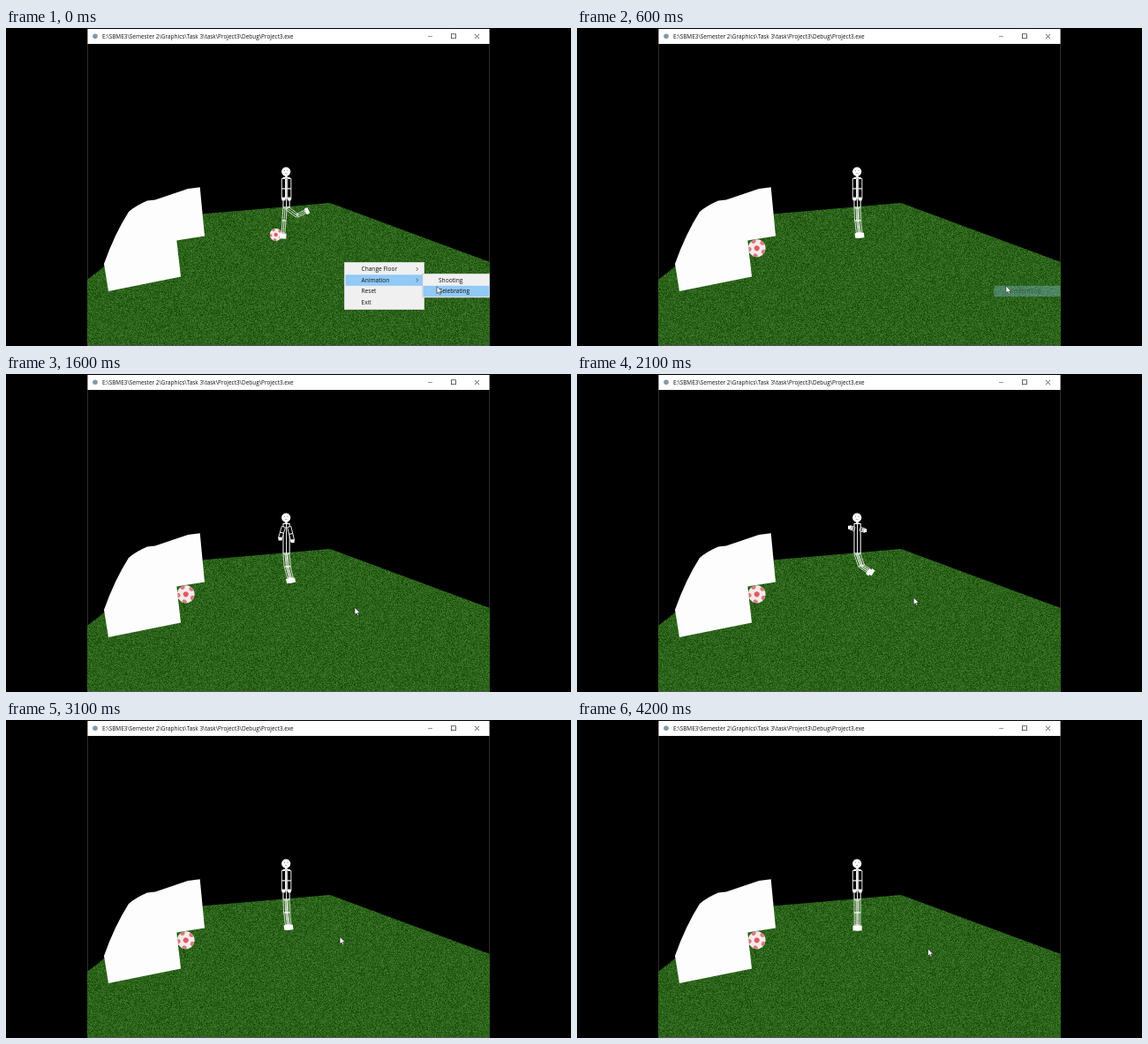
Recreate the animation shown at these times as an HTML page with a canvas. Size 640 px wide and 360 px high, loop 4.3 s.

```html
<!DOCTYPE html>
<html lang="en">
<head>
<meta charset="utf-8">
<title>Football scene</title>
<style>
  html, body { margin: 0; width: 100%; height: 100%; overflow: hidden; background: #000; }
  canvas { display: block; }
</style>
</head>
<body>
<canvas id="stage" width="640" height="360"></canvas>
<script>
const ctx = document.getElementById('stage').getContext('2d');
const LOOP = 4300, STEP = 100;
const SHOT_END = 600, CELEBRATE_PERIOD = 1250;
const FONT = '"Open Sans", sans-serif';
const HIGHLIGHT = '#91c9f7';
const CENTER = 317.6;

const lerp = (a, b, k) => a + (b - a) * k;
const clamp = (v, max = 1) => Math.max(0, Math.min(max, v));
const radians = degrees => degrees * Math.PI / 180;

function rect(x, y, w, h, color) {
  ctx.fillStyle = color;
  ctx.fillRect(x, y, w, h);
}

function disc(x, y, r, color) {
  ctx.beginPath();
  ctx.arc(x, y, r, 0, Math.PI * 2);
  ctx.fillStyle = color;
  ctx.fill();
}

function polygon(...points) {
  ctx.beginPath();
  points.forEach(p => ctx.lineTo(...p));
  ctx.closePath();
}

function line(x0, y0, x1, y1) {
  ctx.beginPath();
  ctx.moveTo(x0, y0);
  ctx.lineTo(x1, y1);
  ctx.stroke();
}

function pen(color, width) {
  ctx.strokeStyle = color;
  ctx.lineWidth = width;
}

function label(text, x, y, size = 6.6) {
  ctx.font = `${size}px ${FONT}`;
  ctx.fillStyle = '#111';
  ctx.fillText(text, x, y);
}

function makeGrass(w, h) {
  const tile = document.createElement('canvas');
  tile.width = w;
  tile.height = h;
  const g = tile.getContext('2d');
  const img = g.createImageData(w, h);
  let seed = 71;
  const random = () => (seed = (seed * 16807) % 2147483647) / 2147483647;
  for (let i = 0; i < w * h; i++) {
    const v = (random() + random() - 1) * 34;
    img.data.set([43 + v * 0.8, 99 + v, 26 + v * 0.65, 255], i * 4);
  }
  g.putImageData(img, 0, 0);
  return tile;
}
const grass = makeGrass(456, 163);

function drawWindow() {
  rect(0, 0, 640, 360, '#000');
  rect(92, 18, 1, 342, '#2c2c2c');
  rect(547, 18, 1, 342, '#2c2c2c');
  rect(92.4, 1, 455.2, 17, '#fff');
  disc(101, 9.3, 2.8, '#8499a8');
  label('E:\\SBME3\\Semester 2\\Graphics\\Task 3\\task\\Project3\\Debug\\Project3.exe', 109, 12, 6.45);
  pen('#555', 0.6);
  line(478, 9.5, 483, 9.5);
  pen('#222', 0.7);
  ctx.strokeRect(504.5, 6.8, 5, 5);
  line(531, 7, 536, 12);
  line(536, 7, 531, 12);
}

function drawField() {
  ctx.save();
  polygon([92, 285], [113, 268.5], [205, 212], [367, 198], [548, 265], [548, 359], [92, 359]);
  ctx.clip();
  ctx.drawImage(grass, 92, 197);
  ctx.restore();
  rect(92, 359, 456, 1, '#555');
}

function drawGoal() {
  ctx.beginPath();
  ctx.moveTo(116, 298);
  ctx.lineTo(111, 267);
  ctx.quadraticCurveTo(123, 233, 139, 208);
  ctx.quadraticCurveTo(147, 201, 160, 195.5);
  ctx.lineTo(169, 194.5);
  ctx.lineTo(206, 182);
  ctx.lineTo(219.7, 180.3);
  ctx.lineTo(225, 235.5);
  ctx.lineTo(193.3, 240.5);
  ctx.lineTo(198, 281.5);
  ctx.fillStyle = '#fdfdfd';
  ctx.fill();
}

function drawBall(t) {
  const k = clamp((t - 200) / 400);
  const r = lerp(7, 10, k);
  ctx.save();
  ctx.translate(lerp(305.7, 203.7, k), lerp(234, 249.3, k));
  ctx.rotate(0.5 - k * Math.PI * 2);
  ctx.scale(r, r);
  disc(0, 0, 1, '#f6eaea');
  ctx.clip();
  disc(0, 0, 0.3, '#dc5c62');
  for (let i = 0; i < 5; i++) {
    const a = i * Math.PI * 0.4;
    disc(Math.cos(a) * 0.88, Math.sin(a) * 0.88, 0.26, '#d8797f');
  }
  ctx.restore();
}

// Draws a wireframe box and returns its far end; angles grow clockwise from straight down on screen.
function limb(x, y, length, angle, width, fill) {
  const dx = -Math.sin(angle), dy = Math.cos(angle), h = width / 2;
  const endX = x - dx * length, endY = y + dy * length;
  polygon([x + dy * h, y + dx * h], [x - dy * h, y - dx * h],
    [endX - dy * h, endY - dx * h], [endX + dy * h, endY + dx * h]);
  if (fill) {
    ctx.fillStyle = fill;
    ctx.fill();
  }
  ctx.stroke();
  return [endX, endY];
}

function drawLeg(hipX, thigh, shin) {
  pen('#fff', 0.75);
  const hipY = 204;
  const knee = limb(hipX, hipY, 14, radians(thigh), 4.2);
  const reach = 14 - 4 * clamp(shin / 55);
  const ankle = limb(...knee, reach, radians(shin), 3.8);
  line(hipX, hipY, ...knee);
  line(...knee, ...ankle);
  ctx.save();
  ctx.translate(...ankle);
  ctx.rotate(-radians(shin));
  rect(-3.6, 0.5, 7.2, 6 - 2 * clamp(shin / 55), '#fff');
  ctx.restore();
}

// raise: 0 hanging, 1 level, 2 overhead
function drawArm(side, raise) {
  const angle = radians(raise * 90);
  const shoulderX = CENTER + side * 3.2, shoulderY = 170.5 + 5 * raise;
  const handX = shoulderX + side * 5.5 * Math.sin(radians(clamp(raise, 1.5) * 90));
  const handY = shoulderY + lerp(23, 15, raise / 2) * Math.cos(angle) + side * 1.8 * Math.sin(angle);
  const direction = Math.atan2(handX - shoulderX, handY - shoulderY);
  const half = Math.hypot(handX - shoulderX, handY - shoulderY) / 2;
  pen('#fff', 0.9);
  const elbow = limb(shoulderX, shoulderY, half, direction, 4.2, '#000');
  limb(...elbow, half, direction, 4.2, '#000');
  if (raise > 0.5) line(shoulderX, shoulderY, handX, handY);
  rect(handX - 1.9, handY - 1.9, 3.8, 3.8, '#fff');
}

function drawBody() {
  pen('#fff', 1);
  ctx.strokeRect(CENTER - 3.6, 169.5, 7.2, 33.5);
  line(CENTER, 170, CENTER, 203);
}

function drawHead() {
  rect(315.8, 167, 3.2, 2.5, '#ddd');
  disc(317.2, 162.6, 5.1, '#fff');
  for (const side of [-1, 1]) rect(316.8 + side * 1.7, 161, 0.8, 0.9, '#666');
  rect(316, 164.4, 2.4, 0.7, '#888');
}

function drawPlayer(t) {
  let raise = 0;
  if (t < SHOT_END) {
    const k = t / SHOT_END, swing = Math.sin(Math.PI * k);
    drawLeg(316, lerp(-4, 2, k), lerp(-4, 6, k));
    drawLeg(318.5, lerp(53, 2, k) - 40 * swing, lerp(115, 6, k) - 80 * swing);
  } else {
    const phase = (t - SHOT_END) % CELEBRATE_PERIOD;
    const bend = clamp(Math.min(0.12 + phase / 220, (1100 - phase) / 400));
    raise = clamp(Math.min(phase / 250, (1100 - phase) / 200), 2);
    for (const side of [-1, 1]) drawLeg(CENTER + side * 1.5, 19 * bend, 55 * bend);
  }
  drawBody();
  for (const side of [-1, 1]) drawArm(side, raise);
  drawHead();
}

function panel(x, y, w, h) {
  rect(x, y, w, h, '#c4c4c4');
  rect(x + 0.7, y + 0.7, w - 1.4, h - 1.4, '#f0f0f0');
}

function chevron(x, y) {
  pen('#333', 0.7);
  line(x, y - 2, x + 1.8, y);
  line(x + 1.8, y, x, y + 2);
}

function chosenRow() {
  rect(472.5, 291.8, 75, 12.2, HIGHLIGHT);
  label('Celebrating', 490, 300.2);
}

function drawMenu(t) {
  if (t < 200) {
    panel(383, 265, 91, 54);
    rect(384.5, 279.3, 88.5, 12.5, HIGHLIGHT);
    ['Change Floor', 'Animation', 'Reset', 'Exit'].forEach((text, i) => {
      label(text, 402.5, 275.2 + i * 12.6);
      if (i < 2) chevron(464.8, 273 + i * 12.5);
    });
    panel(471.5, 278, 76.5, 27.3);
    label('Shooting', 490, 287.8);
  }
  ctx.globalAlpha = clamp(1 - (t - 200) / 600);
  chosenRow();
  ctx.globalAlpha = 1;
}

// The pointer travels in straight legs between a few resting points.
const POINTER = [
  { t: 0, x: 488, y: 292.5 }, { t: 600, x: 486, y: 292 }, { t: 1200, x: 406, y: 273.5 },
  { t: 2100, x: 381.3, y: 253 }, { t: 3700, x: 376.2, y: 241 }, { t: LOOP - STEP, x: 397.5, y: 259 }
];

function drawCursor(t) {
  const next = Math.max(1, POINTER.findIndex(p => p.t >= t));
  const a = POINTER[next - 1], b = POINTER[next];
  const k = (t - a.t) / (b.t - a.t);
  ctx.save();
  ctx.translate(lerp(a.x, b.x, k), lerp(a.y, b.y, k));
  polygon([0, 0], [0, 8], [2, 6.4], [3.3, 9.2], [4.6, 8.6], [3.4, 6], [5.8, 5.8]);
  ctx.fillStyle = '#fff';
  ctx.fill();
  pen('#222', 0.6);
  ctx.stroke();
  ctx.restore();
}

function draw(now) {
  const step = Math.floor((now % LOOP) / STEP) * STEP;
  const t = step < 200 ? 0 : step;
  drawWindow();
  drawField();
  drawBall(t);
  drawGoal();
  drawPlayer(t);
  drawMenu(t);
  drawCursor(t);
}

const start = performance.now();
function tick() {
  draw(performance.now() - start);
  requestAnimationFrame(tick);
}
tick();
</script>
</body>
</html>
```
